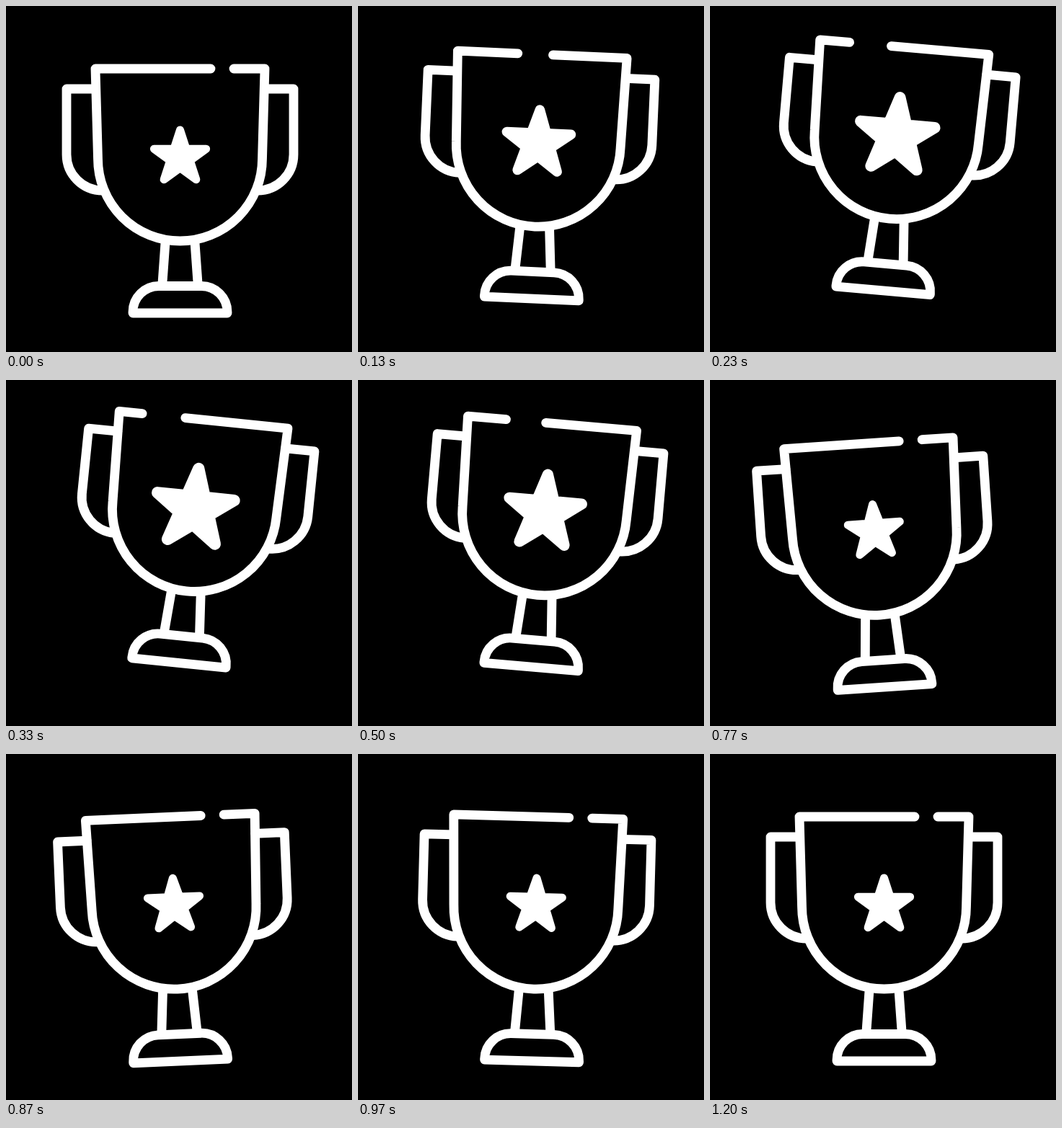
Write an HTML page with a canvas that moves like this. It is 480 px wide and 480 px high and loops after 1530 ms.

```html
<!DOCTYPE html>
<html lang="en">
<head>
<meta charset="utf-8">
<title>Trophy</title>
<style>
  html, body { margin: 0; width: 100%; height: 100%; overflow: hidden; background: #000; }
  canvas { display: block; width: 480px; height: 480px; }
</style>
</head>
<body>
<canvas id="stage" width="480" height="480"></canvas>
<script>
const ctx = document.getElementById('stage').getContext('2d');
const LOOP = 1530;
const STEP = 100 / 3;
const PIVOT = { x: 241.5, y: 410 };
const STAR = { y: 210, anchorY: 207, radius: 38 };

// Bezier timing curve with flat ends; a and b are the x positions of the handles.
const ease = (a, b) => u => {
  let lo = 0, hi = 1;
  for (let i = 0; i < 24; i++) {
    const s = (lo + hi) / 2, r = 1 - s;
    const x = 3 * r * r * s * a + 3 * r * s * s * b + s * s * s;
    if (x < u) lo = s; else hi = s;
  }
  return lo * lo * (3 - 2 * lo);
};
const smooth = ease(1 / 3, 2 / 3);

// Each key is [step, value, easing from the previous key].
function track(keys) {
  return step => {
    for (let i = 1; i < keys.length; i++) {
      const [t0, v0] = keys[i - 1], [t1, v1, curve] = keys[i];
      if (step < t1) return v0 + (v1 - v0) * curve((step - t0) / (t1 - t0));
    }
    return keys[keys.length - 1][1];
  };
}

const jump = track([[0, 0], [10, 1, ease(0.333, 0.27)], [20, 0, ease(0.9, 0.667)]]);
const tilt = track([
  [0, 0], [10, 5.8, ease(0.333, 0.5)], [24, -4, ease(0.833, 0.64)],
  [30, 2, smooth], [36, 0, smooth]
]);
const starScale = track([[0, 1], [10, 1.48, ease(0.333, 0.42)], [22, 1, ease(0.667, 0.667)]]);

function stroke(build) {
  ctx.beginPath();
  build();
  ctx.stroke();
}

function line(x0, y0, x1, y1) {
  stroke(() => { ctx.moveTo(x0, y0); ctx.lineTo(x1, y1); });
}

function drawCup(open) {
  const cx = PIVOT.x, top = 87, half = 117.5, bowl = 114, bowlY = 212;
  const left = cx - half, right = cx + half;
  stroke(() => {
    ctx.moveTo(left + 160 - 128 * open, top);
    ctx.lineTo(left, top);
    ctx.lineTo(cx - bowl, bowlY);
    ctx.arc(cx, bowlY, bowl, Math.PI, 0, true);
    ctx.lineTo(right, top);
    ctx.lineTo(left + 192 - 100 * open, top);
  });
  for (const side of [-1, 1]) {
    const at = d => cx + side * d;
    stroke(() => {
      ctx.moveTo(at(117), 115);
      ctx.lineTo(at(157.5), 115);
      ctx.lineTo(at(157.5), 206);
      ctx.arcTo(at(157.5), 256, at(107.5), 256, 50);
    });
    line(at(20.5), 328, at(24.5), 384);
  }
}

function drawBase() {
  const left = PIVOT.x - 65.5, right = PIVOT.x + 65.5;
  stroke(() => {
    ctx.moveTo(left, 426);
    ctx.arcTo(left, 388.5, left + 36, 388.5, 36);
    ctx.arcTo(right, 388.5, right, 426, 36);
    ctx.lineTo(right, 426);
    ctx.closePath();
  });
}

function drawStar(scale) {
  ctx.save();
  ctx.translate(PIVOT.x, STAR.anchorY);
  ctx.scale(scale, scale);
  ctx.translate(0, STAR.y - STAR.anchorY);
  ctx.lineWidth = 11;
  ctx.beginPath();
  for (let i = 0; i < 10; i++) {
    const r = STAR.radius * (i % 2 ? 0.382 : 1);
    const a = i * Math.PI / 5;
    ctx.lineTo(r * Math.sin(a), -r * Math.cos(a));
  }
  ctx.closePath();
  ctx.fill();
  ctx.stroke();
  ctx.restore();
}

function render(ms) {
  const step = Math.floor((ms % LOOP + 4) / STEP);
  const lift = jump(step);
  ctx.fillStyle = '#000';
  ctx.fillRect(0, 0, 480, 480);
  ctx.save();
  ctx.fillStyle = ctx.strokeStyle = '#fff';
  ctx.lineWidth = 12.8;
  ctx.lineCap = ctx.lineJoin = 'round';
  ctx.translate(PIVOT.x, PIVOT.y - 33.5 * lift);
  ctx.rotate(tilt(step) * Math.PI / 180);
  ctx.translate(-PIVOT.x, -PIVOT.y);
  drawCup(lift);
  drawBase();
  drawStar(starScale(step));
  ctx.restore();
}

const start = performance.now();
function tick() {
  render(performance.now() - start);
  requestAnimationFrame(tick);
}
tick();
</script>
</body>
</html>
```
